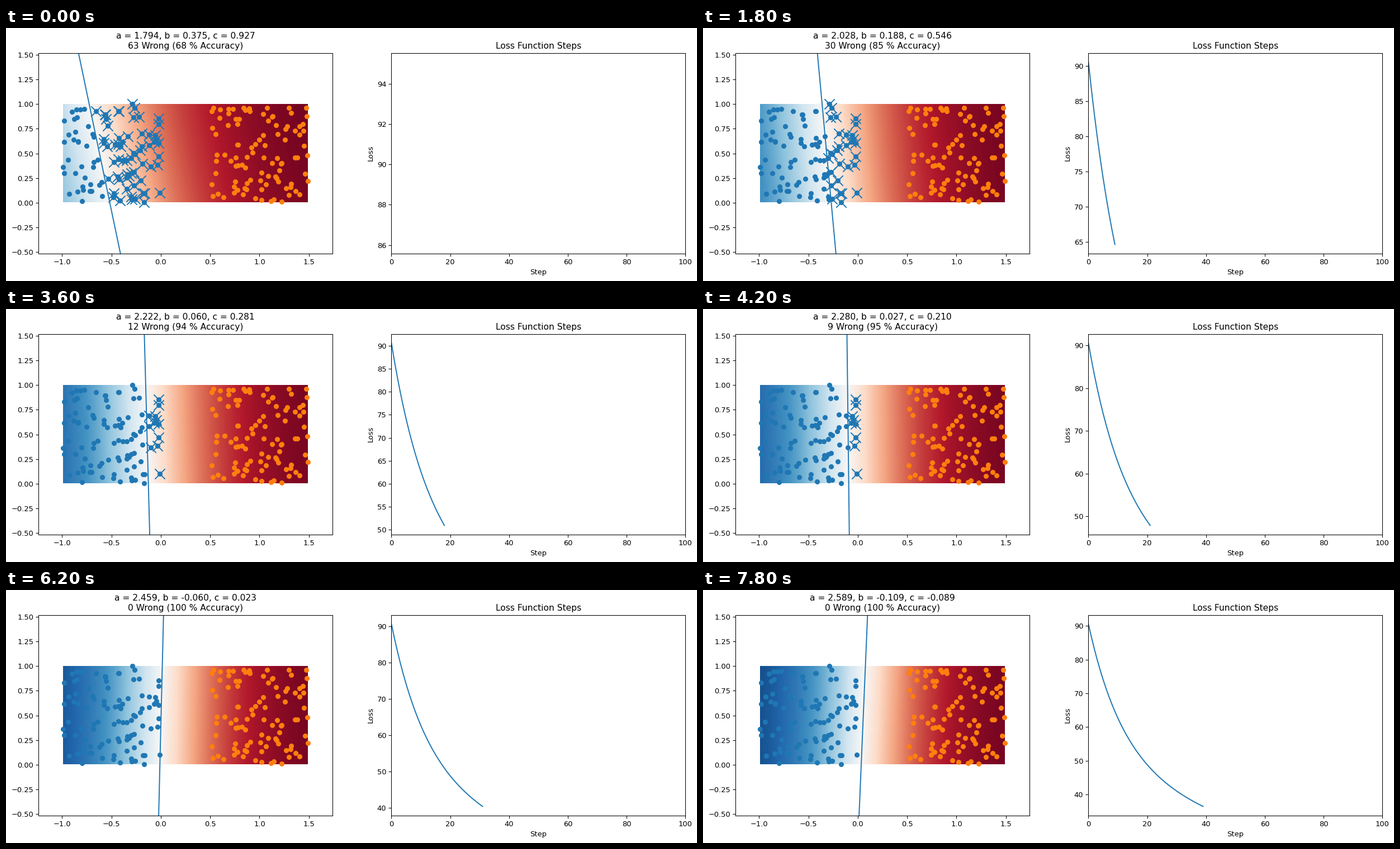
Animation, 1236 px wide and 453 px high, one loop 8000 ms. Source, as a matplotlib script:

```python
import matplotlib.pyplot as plt
import numpy as np
from matplotlib.animation import FuncAnimation

WIDTH, HEIGHT, DPI = 1236, 453, 93.3
STEPS, RATE = 40, 0.001
PAD = 0.25
AX_W, AX_H, AX_TOP = 525.9, 359.2, 44.6


def sigmoid(z):
    return 1 / (1 + np.exp(-z))


def inches(pixels):
    # The tiny surplus keeps rounding from losing a pixel
    return (pixels + 1e-6) / DPI


def add_axes(left):
    """Axes whose left edge is given in pixels from the left of the stage."""
    bottom = HEIGHT - AX_TOP - AX_H
    return fig.add_axes([left / WIDTH, bottom / HEIGHT, AX_W / WIDTH, AX_H / HEIGHT])


# Two uniform clouds and a random starting line
rng = np.random.RandomState(0)
weights = rng.randn(3)
left_pts = rng.rand(100, 2) - [1, 0]
right_pts = rng.rand(100, 2) + [0.5, 0]
points = np.vstack([left_pts, right_pts])
features = np.column_stack([points, np.ones(len(points))])
labels = np.repeat([0, 1], 100)

# Logistic regression by full-batch gradient descent
history, losses = [], []
for _ in range(STEPS):
    error = sigmoid(features @ weights) - labels
    weights = weights - RATE * features.T @ error
    z = features @ weights
    history.append(weights)
    losses.append(np.sum(np.logaddexp(0, z) - labels * z))

fig = plt.figure(figsize=(inches(WIDTH), inches(HEIGHT)), dpi=DPI, facecolor="white")
data_ax = add_axes(58.3)
loss_ax = add_axes(689.4)

# Left panel: probability field, clouds, misclassified marks, boundary
(x0, y0), (x1, y1) = points.min(axis=0), points.max(axis=0)
grid_x, grid_y = np.meshgrid(np.linspace(x0, x1, 438), np.linspace(y0, y1, 176))
field = data_ax.imshow(np.zeros_like(grid_x), extent=(x0, x1, y0, y1), origin="lower",
                       aspect="auto", cmap="RdBu_r", vmin=0, vmax=1, zorder=0)
data_ax.scatter(*left_pts.T, color="C0")
data_ax.scatter(*right_pts.T, color="C1")
marks = data_ax.scatter([], [], s=200, marker="x", color="C0")
boundary, = data_ax.plot([], [], color="C0")

x_lim = (x0 - PAD, x1 + PAD)
half_y = (x_lim[1] - x_lim[0]) * AX_H / AX_W / 2
mid_y = (y0 + y1) / 2
y_lim = np.array([mid_y - half_y, mid_y + half_y])
data_ax.set_xlim(x_lim)
data_ax.set_ylim(y_lim)

# Right panel: loss curve with a self-scaling vertical axis
curve, = loss_ax.plot([], [], color="C0")
loss_ax.set_xlim(0, 100)
loss_ax.set_title("Loss Function Steps")
loss_ax.set_xlabel("Step")
loss_ax.set_ylabel("Loss")


def update(step):
    a, b, c = history[step]
    field.set_data(sigmoid(a * grid_x + b * grid_y + c))
    boundary.set_data(-(b * y_lim + c) / a, y_lim)

    wrong = (features @ history[step] > 0) != labels
    marks.set_offsets(points[wrong])
    count = int(wrong.sum())
    accuracy = 100 * (len(points) - count) // len(points)
    data_ax.set_title(f"a = {a:.3f}, b = {b:.3f}, c = {c:.3f}\n"
                      f"{count} Wrong ({accuracy} % Accuracy)")

    curve.set_data(range(step + 1), losses[:step + 1])
    loss_ax.relim()
    loss_ax.autoscale_view(scalex=False)
    return field, boundary, marks, curve


anim = FuncAnimation(fig, update, frames=STEPS, interval=200, repeat=True,
                     repeat_delay=0, blit=False)
plt.show()
```
